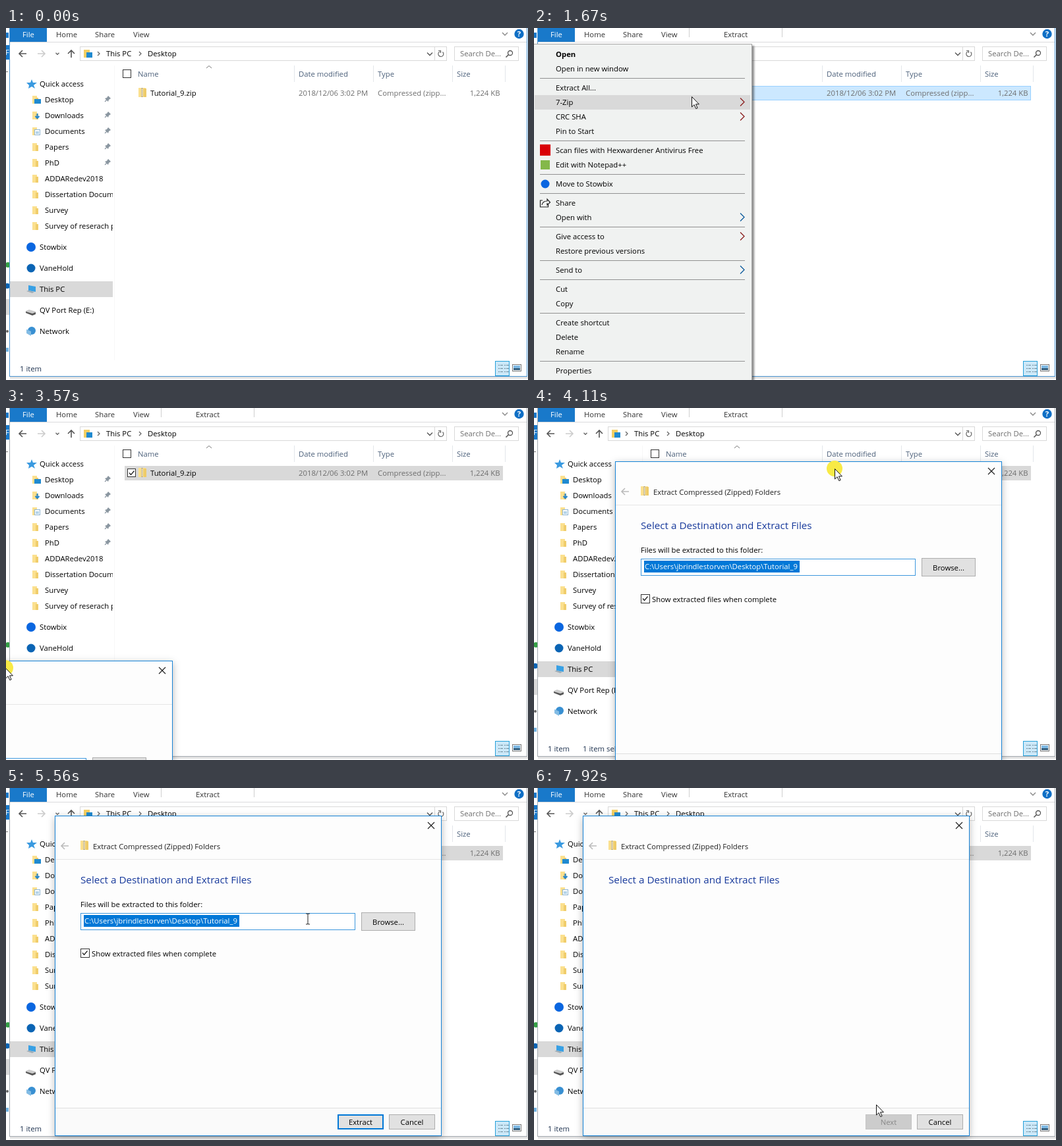
Animation, 792 px wide and 535 px high, one loop 8 s. Source, as an HTML page:

```html
<!DOCTYPE html>
<html lang="en">
<head>
<meta charset="utf-8">
<title>Extracting a zip file</title>
<style>
  html, body { margin: 0; width: 100%; height: 100%; overflow: hidden; background: #fff; }
  svg { display: block; width: 100vw; height: 100vh; }
  text { font-family: "Open Sans", "Noto Sans", sans-serif; font-size: 11.3px; }
</style>
</head>
<body>
<svg id="stage" viewBox="0 0 792 535"></svg>
<script>
const LOOP = 8000;
const BLUE = '#0078d7';

// Markup helpers
const text = (x, y, s, fill = '#000', extra = '') => `<text x="${x}" y="${y}" fill="${fill}" ${extra}>${s}</text>`;
const rect = (x, y, w, h, fill, extra = '') => `<rect x="${x}" y="${y}" width="${w}" height="${h}" fill="${fill}" ${extra}/>`;
const box = (x, y, w, h, fill, stroke, extra = '') => rect(x + .5, y + .5, w - 1, h - 1, fill, `stroke="${stroke}" ${extra}`);
const line = (d, stroke, width = 1) => `<path d="${d}" fill="none" stroke="${stroke}" stroke-width="${width}"/>`;
const dot = (x, y, r, fill) => `<circle cx="${x}" cy="${y}" r="${r}" fill="${fill}"/>`;
const group = (id, body, extra = '') => `<g id="${id}" ${extra}>${body}</g>`;
const centred = 'text-anchor="middle"';

const chevron = (x, y, stroke, s = 3) => line(`M${x} ${y - s}l${s} ${s}l${-s} ${s}`, stroke, 1.3);
const chevronDown = (x, y, stroke, s = 4) => line(`M${x - s} ${y - s / 2}l${s} ${s}l${s} ${-s}`, stroke, 1.4);
const arrowLeft = (x, y, stroke) => line(`M${x + 12} ${y}h-11m5 -5l-5 5l5 5`, stroke, 1.6);
const checkbox = (x, y, checked, size = 13) => box(x, y, size, size, '#fff', '#333') +
  (checked ? line(`M${x + 3} ${y + 6.5}l2.5 3l5 -6`, '#222', 1.3) : '');
const folder = (x, y) => rect(x, y, 7, 12, '#fbe08f') + rect(x + 5, y + 3, 4, 9, '#f0cd6c');
const zipIcon = (x, y) => rect(x, y, 11, 14, '#fbe08f') + rect(x + 8, y + 1, 4, 13, '#eecb68') +
  line(`M${x + 5.5} ${y}v14`, '#a59a78', 2) + line(`M${x + 5.5} ${y + 1}v12`, '#f4f4f4', .8);
const pin = (x, y) => line(`M${x - 4} ${y + 4}l3 -3`, '#8a96a0', 1.2) +
  `<path d="M${x - 4} ${y - 1}l5 5l1 -3l3 -2l-4 -4l-2 3z" fill="#8a96a0"/>`;

function ribbon() {
  return rect(6, 0, 56, 21, '#1979ca') + text(25, 14, 'File', '#fff') +
    text(76, 14, 'Home', '#333') + text(135, 14, 'Share', '#333') + text(193, 14, 'View', '#333') +
    line('M6 21.5H790', '#dadbdc') + chevronDown(757, 9, '#888') +
    dot(778.5, 9, 7.2, '#0f6fc5') + text(778.5, 13, '?', '#fff', centred + ' font-weight="700"');
}

function addressBar() {
  return arrowLeft(19, 39, '#555') +
    line('M48 39h11m-5 -5l5 5l-5 5', '#ccc', 1.6) + chevronDown(78, 39, '#666', 2.5) +
    line('M99 45v-11m-5 5l5 -5l5 5', '#555', 1.6) +
    box(112, 28, 557, 22, '#fff', '#d9d9d9') + line('M650.5 28v22', '#d9d9d9') +
    rect(118, 33, 9, 12, '#f4cf64') + rect(122, 37, 9, 8, '#1f8ad0') +
    chevron(139, 39, '#666') + text(152, 43, 'This PC') + chevron(202, 39, '#666') + text(215, 43, 'Desktop') +
    chevronDown(643, 39.5, '#555') + line('M662.5 36.500a4 4 0 1 1 -4 -.8M656 34.500h3.500v3.500', '#666', 1.2) +
    box(680, 28, 98, 22, '#fff', '#d9d9d9') + text(689, 43, 'Search De...', '#6d6d6d') +
    `<circle cx="765" cy="38" r="3.5" fill="none" stroke="#555" stroke-width="1.3"/>` + line('M762.5 40.5l-4 4', '#555', 1.6);
}

function sidebar() {
  const folders = ['Desktop', 'Downloads', 'Documents', 'Papers', 'PhD', 'ADDARedev2018',
    'Dissertation Documents', 'Survey', 'Survey of reserach practice'];
  const star = '<path d="M39 78l2 5l6 0l-5 4l2 5l-5 -3l-5 3l1 -5l-4 -4l6 0z" fill="#3a9ae0"/>';
  const badges = [rect(43, 108, 10, 7, '#1f8ad0'), line('M47.5 130v7m-3 -3l3 3l3 -3', '#2586d0', 2),
    box(43, 154, 9, 9, '#fff', '#8db4d2') + line('M45 158h5m-5 2h5', '#68a7d2')];
  const quick = folders.map((name, i) => folder(40, 103 + 24 * i) + (badges[i] || '') +
    text(59, 113 + 24 * i, name) + (i < 5 ? pin(154, 108 + 24 * i) : '')).join('');
  const roots = ['Stowbix', 'VaneHold', 'This PC', 'QV Port Rep (E:)', 'Network']
    .map((name, i) => text(51, 337 + 32 * i, name)).join('');
  const icons = dot(38, 333, 7, '#0a66e0') + dot(38, 365, 6.5, '#0a64b4') +
    `<path d="M34 391l11 2v8l-11 -2z" fill="#38a0e4"/><path d="M31 400l3 -1l9 2l-3 2z" fill="#9cabb5"/>` +
    `<path d="M30 430l5 -2l10 3v3l-5 2l-10 -4z" fill="#ccc"/><path d="M30 431l10 3l5 -2v3l-5 2l-10 -4z" fill="#555"/>` +
    dot(39, 460, 6, '#3990d2') + `<path d="M31 458l7 3v7l-7 -4z" fill="#83bce4"/>`;
  return rect(6, 385, 156, 24, '#d9d9d9') +
    `<clipPath id="side"><rect x="6" y="57" width="156" height="440"/></clipPath>` +
    `<g clip-path="url(#side)">${star}${text(51, 89, 'Quick access')}${quick}${roots}${icons}</g>` +
    line('M164.5 57V505', '#f8f8f8');
}

function fileList() {
  const heading = '#4c607a', dim = '#6d6d6d';
  return checkbox(177, 63, false) + line('M304 61l4 -3.5l4 3.5', '#777') +
    text(200, 74, 'Name', heading) + text(444, 74, 'Date modified', heading) +
    text(564, 74, 'Type', heading) + text(684, 74, 'Size', heading) +
    [437, 557, 677, 757].map(x => line(`M${x}.5 57v25`, '#e3e6ea')).join('') +
    box(180, 88, 574, 22, 'none', 'none', 'id="row"') + group('rowCheck', checkbox(184, 92, true)) +
    zipIcon(201, 91) + text(219, 103, 'Tutorial_9.zip') + text(444, 103, '2018/12/06 3:02 PM', dim) +
    text(564, 103, 'Compressed (zipp...', dim) + text(749.5, 103, '1,224 KB', dim, 'text-anchor="end"');
}

function statusBar() {
  const ink = '#1f3350';
  const rows = [512, 517, 522].map(y => line(`M747 ${y}.5h2m1 0h4m2 0h2m1 0h4`, '#6f8c9c')).join('');
  return text(21, 522, '1 item', ink) +
    group('selectedNote', text(74, 522, '1 item selected', ink) + text(160, 522, '1.19 MB', ink)) +
    box(742, 506, 22, 23, '#cce8f8', '#26a0da') + rows +
    box(768, 511, 14, 11, '#fff', '#777') + rect(770, 513, 10, 7, '#7cb8e4') + rect(770, 517, 10, 3, '#365f7d');
}

function backdrop() {
  return rect(0, 7, 4, 8, '#1979ca') + rect(0, 26, 5, 22, '#1979ca') + text(-1, 41, 'Fi', '#fff') +
    line('M0 66.5h3', '#777') + dot(3, 360, 4, '#35a046') + dot(2, 392, 4, '#0a64b4') +
    rect(0, 412, 5, 24, '#d9d9d9') + dot(2, 461, 2, '#666') + rect(0, 486, 4, 6, '#73b4e2') +
    line('M6 531.5H792', '#e2e2e2', 3) + box(5, -2, 786, 532, '#fff', '#4a93d0', 'id="windowFrame"');
}

const MENU = [
  [44, 'Open'], [66, 'Open in new window'], [95, 'Extract All...'], [117, '7-Zip', 'red'], [139, 'CRC SHA', 'red'],
  [161, 'Pin to Start'], [190, 'Scan files with Hexwardener Antivirus Free'], [212, 'Edit with Notepad++'],
  [241, 'Move to Stowbix'], [270, 'Share'], [292, 'Open with', 'blue'], [321, 'Give access to', 'red'],
  [343, 'Restore previous versions'], [372, 'Send to', 'blue'], [401, 'Cut'], [423, 'Copy'],
  [452, 'Create shortcut'], [474, 'Delete'], [496, 'Rename'], [525, 'Properties']
];

function contextMenu() {
  const tints = { red: '#8c2020', blue: '#0b5a9c' };
  const rules = [76, 171, 222, 251, 302, 353, 382, 433, 506];
  return box(-1, 24, 332, 530, '#f0f2f1', '#a5a5a5', 'filter="url(#menuShadow)"') +
    rect(1, 80, 327, 22, '#d9d9d9', 'id="menuHover"') +
    rules.map(y => line(`M9 ${y}.5H320`, '#919191')).join('') +
    MENU.map(([y, label, arrow], i) => text(33, y, label, '#000', i ? '' : 'font-weight="700"') +
      (arrow ? chevron(313, y - 4.5, tints[arrow], 6) : '')).join('') +
    rect(9, 177, 16, 17, '#d90007') + rect(10, 201, 14, 14, '#84b84a') + dot(17, 237, 6.5, '#0a66e0') +
    line('M13 262h-3.5v10h12v-4M12 269c1 -5 4 -6 8 -6v-3l4.500 5l-4.500 4v-3', '#222', 1.2);
}

function button(id, x, y, w, h, label, fill, stroke, ink = '#000', width = 1) {
  const face = rect(x + width / 2, y + width / 2, w - width, h - width, fill, `stroke="${stroke}" stroke-width="${width}"`);
  return group(id, face + text(x + w / 2, y + h / 2 + 4.5, label, ink, centred));
}

// Coordinates are relative to the dialog's top left corner
function dialog() {
  const path = 'C:\\Users\\jbrindlestorven\\Desktop\\Tutorial_9';
  const form = text(39, 139, 'Files will be extracted to this folder:') +
    box(39, 148, 417, 26, '#fff', '#3c97dd') + rect(44, 151, 236, 18, BLUE, 'id="pathSelection"') +
    text(45, 164, path, '#000', 'id="path"') +
    button('browse', 465, 147, 82, 28, 'Browse...', '#e1e1e1', '#adadad') +
    checkbox(39, 202, true, 14) + text(56, 214, 'Show extracted files when complete') +
    button('extract', 429, 454, 70, 23, 'Extract', '#e1e1e1', BLUE, '#000', 2);
  return box(0, 0, 587, 487, '#fdfdfd', '#1883d7', 'filter="url(#dialogShadow)"') +
    line('M566 10l10 10m0 -10l-10 10', '#222', 1.2) + arrowLeft(9, 46, '#bbb') +
    zipIcon(39, 38) + text(58, 50.5, 'Extract Compressed (Zipped) Folders', '#222') +
    line('M1 66.5H586', '#e6e6e6') +
    text(39, 102.5, 'Select a Destination and Extract Files', '#17399b', 'style="font-size:15.26px"') +
    rect(1, 444, 585, 42, '#fafafa') + line('M1 444.5H586', '#dfdfdf') + group('form', form) +
    button('next', 429, 454, 70, 23, 'Next', '#cccccc', '#c4c4c4', '#888') +
    button('cancel', 507, 454, 70, 23, 'Cancel', '#e1e1e1', '#adadad');
}

const shadow = (id, dx, dy, blur, alpha) => `<filter id="${id}" x="-10%" y="-10%" width="120%" height="120%">
  <feDropShadow dx="${dx}" dy="${dy}" stdDeviation="${blur}" flood-opacity="${alpha}"/></filter>`;

stage.innerHTML = `<defs>${shadow('menuShadow', 3, 3, 1.5, .45)}${shadow('dialogShadow', 0, 3, 6, .28)}</defs>` +
  backdrop() + ribbon() +
  group('extractTab', text(288, 14, 'Extract', '#333') + line('M235.500 0v14M376.500 0v14', '#d0d0d0')) +
  addressBar() + sidebar() + fileList() + statusBar() +
  group('menu', contextMenu()) + group('wizard', dialog()) + group('clickRing', dot(0, 0, 12, '#f8ea45')) +
  group('arrow', '<path d="M.5 .5v15.500l3.600 -3.400l2.700 6l2.300 -1l-2.600 -5.800h4.900z" fill="#fff" stroke="#111"/>') +
  group('beam', line('M-3 -8h2.500l.5 1l.5 -1h2.500M0 -7v14M-3 8h2.500l.5 -1l.5 1h2.500', '#222'));

const el = Object.fromEntries([...stage.querySelectorAll('[id]')].map(n => [n.id, n]));
const show = (name, on) => el[name].style.display = on ? '' : 'none';
const paint = (name, attrs) => Object.entries(attrs).forEach(([k, v]) => el[name].setAttribute(k, v));
const moveTo = (name, [x, y]) => paint(name, { transform: `translate(${x} ${y})` });
const between = (v, a, b) => v >= a && v < b;

// Keys are [time, x, y]
function along(keys, t) {
  const next = keys.findIndex(k => k[0] > t);
  if (next < 0) return keys.at(-1).slice(1);
  if (next === 0) return keys[0].slice(1);
  const [a, b] = [keys[next - 1], keys[next]];
  const p = (t - a[0]) / (b[0] - a[0]);
  return [1, 2].map(i => Math.round(a[i] + (b[i] - a[i]) * p));
}

const POINTER = [
  [100, 400, 57], [350, 320, 72], [650, 250, 97], [760, 243, 100], [1600, 243, 100], [1700, 238, 105],
  [1920, 208, 45], [2060, 188, 70], [2240, 174, 91], [2790, 174, 91], [3130, -1, 395]
];
const POINTER_FREE = [
  [4900, 407, 53], [5120, 470, 100], [5350, 558, 165], [5600, 440, 205], [5700, 360, 214], [5800, 393, 216],
  [5900, 393, 214], [6080, 380, 207], [6340, 380, 207], [6460, 375, 217], [6680, 391, 231], [6800, 391, 231],
  [6920, 430, 330], [7110, 566, 508], [7220, 541, 508], [7550, 541, 508], [7800, 525, 490], [7900, 519, 481]
];
const DIALOG = [
  [3660, -334, 384], [3800, -230, 300], [4000, 40, 140], [4200, 190, 34], [4330, 110, 46], [4450, 107, 44],
  [4600, 107, 44], [4670, 103, 43], [4760, 103, 43], [4860, 74, 42]
];
const CLICKS = [[760, 880], [2580, 2790], [3570, 4860], [6130, 6350], [7220, 7440]];

function draw(t) {
  const corner = along(DIALOG, t);
  const dragging = between(t, 3130, 4880);
  const pointer = dragging ? [corner[0] + 333, corner[1] + 11] : along(t < 3130 ? POINTER : POINTER_FREE, t);
  const [px, py] = pointer;

  const selected = t >= 880, hovered = t >= 100 && py >= 88, focusLost = t >= 2790;
  paint('row', {
    fill: focusLost ? '#d9d9d9' : selected ? '#cce8ff' : hovered ? '#e5f3ff' : 'none',
    stroke: focusLost ? '#d9d9d9' : selected ? '#99d1ff' : 'none'
  });
  paint('windowFrame', { stroke: focusLost ? '#a3a9af' : '#4a93d0' });
  show('rowCheck', selected || hovered);
  show('selectedNote', selected);
  show('extractTab', t >= 980);

  show('menu', between(t, 1320, 2790));
  const item = MENU.find(([y]) => between(py, y - 15, y + 7));
  show('menuHover', item);
  if (item) paint('menuHover', { y: item[0] - 15 });

  show('wizard', t >= 2900);
  moveTo('wizard', corner);
  show('pathSelection', t < 6350);
  paint('path', { fill: t < 6350 ? '#fff' : '#000' });
  const overExtract = t > 4880 && between(px, 503, 572) && between(py, 496, 518);
  el.extract.firstElementChild.setAttribute('fill', overExtract ? '#e5f1fb' : '#e1e1e1');
  show('form', t < 7550);
  show('next', t >= 7550);

  const overPath = between(t, 4880, 7000) && between(px, 113, 530) && between(py, 191, 216);
  show('clickRing', CLICKS.some(([from, to]) => between(t, from, to)));
  show('arrow', t >= 100 && !overPath);
  show('beam', overPath);
  ['clickRing', 'arrow', 'beam'].forEach(name => moveTo(name, pointer));
}

const start = performance.now();
function tick() {
  draw((performance.now() - start) % LOOP);
  requestAnimationFrame(tick);
}
tick();
</script>
</body>
</html>
```
